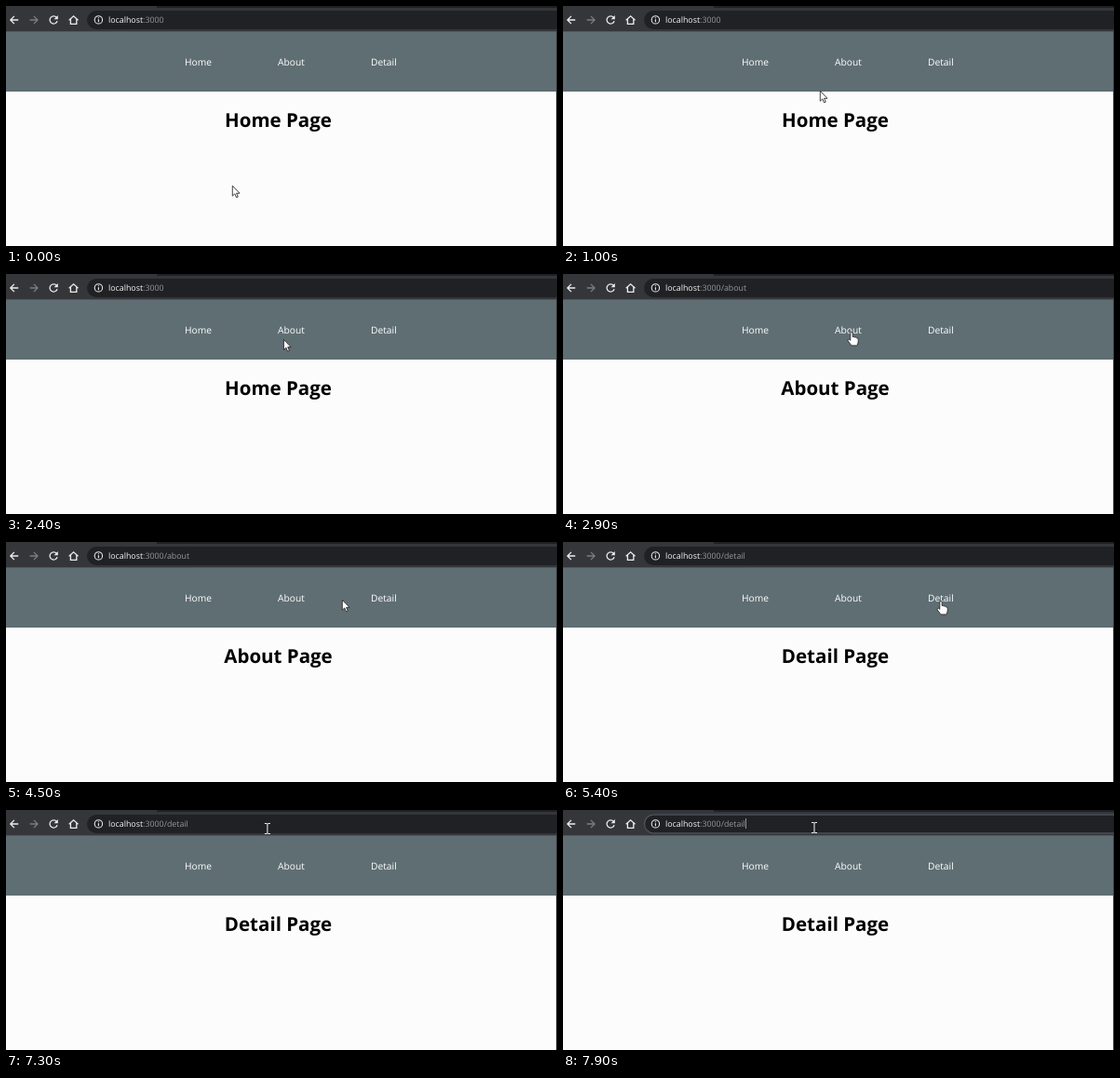
Animation, 592 px wide and 258 px high, one loop 8000 ms. Source, as an HTML page:

```html
<!DOCTYPE html>
<html lang="en">
<head>
<meta charset="utf-8">
<title>Routing demo</title>
<style>
  html, body { margin: 0; width: 100%; height: 100%; overflow: hidden; background: #fcfcfc; }
  svg { display: block; }
  text { font-family: "Open Sans", "Noto Sans", sans-serif; text-rendering: geometricPrecision; }
  .url { font-size: 8.85px; fill: #94979b; }
  .host { fill: #f4f5f6; }
  .nav { font-size: 10.25px; fill: #fff; }
  .title { font-size: 20.5px; font-weight: 700; fill: #000; text-anchor: middle; }
  .icon { fill: none; stroke: #eceded; stroke-width: 1.3; }
  .pointer { fill: #fff; stroke: #222; stroke-width: .85; }
</style>
</head>
<body>
<svg width="592" height="258" viewBox="0 0 592 258">
  <rect width="592" height="258" fill="#fcfcfc"/>

  <!-- browser toolbar -->
  <rect width="592" height="27" fill="#35363a"/>
  <rect x="162" width="430" height="2" fill="#202124"/>
  <rect x="87" y="5" width="530" height="20" rx="10" fill="#202124"/>
  <rect id="ring" x="87.5" y="5.2" width="530" height="19.6" rx="9.8" fill="none" stroke="#4b545d" stroke-width="1.3"/>
  <path class="icon" d="M13.2 15H5M8.9 10.9 4.8 15l4.1 4.1"/>
  <path class="icon" d="M25.6 15h8.2M29.9 10.9 34 15l-4.1 4.1" style="stroke:#7c7d80"/>
  <path class="icon" d="M54.4 12.4A4.1 4.1 0 1 0 55.1 16.2"/>
  <path d="M55.8 10v4.2h-4.2z" fill="#eceded"/>
  <path class="icon" d="M67.7 15.2 72.6 10.8 77.5 15.2M69.4 14V19.3H75.8V14"/>
  <circle class="icon" cx="99.4" cy="14.9" r="4.2" style="stroke-width:1.05"/>
  <path class="icon" d="M99.4 14.3v3M99.4 12.2v1.1" style="stroke-width:1.1"/>
  <text class="url" x="110" y="18"><tspan class="host">localhost</tspan><tspan id="path"></tspan></text>
  <rect id="caret" x="196" y="9" width="1" height="11" fill="#94979b"/>

  <!-- page -->
  <rect y="27" width="591" height="65" fill="#5f6e73"/>
  <rect y="27" width="592" height="1" fill="#4f5b60"/>
  <g id="nav"></g>
  <text class="title" id="title" x="292.5" y="129.5"></text>
  <rect x="591" y="27" width="1" height="231" fill="#45484b"/>

  <!-- pointer shapes, hotspot at 0,0 -->
  <g id="pointer">
    <path id="arrow" class="pointer" d="M.3.3V11.2L2.8 8.9 4.5 12.9 6.3 12.1 4.6 8.3H8Z"/>
    <path id="hand" class="pointer" d="M-1.2 8.4V.8Q-1.2-.5 0-.5T1.2.8V4.6Q2.6 4 3.4 5.1 4.8 4.6 5.4 5.8 7.2 5.4 7.2 7.2V9.8Q7 12 5.8 13.9H-.1Q-1.6 11.6-3.8 9Q-4.4 7.9-3.4 7.3T-1.2 8.4Z"/>
    <path id="beam" fill="none" stroke="#f4f4f4" d="M-3-5.5H-.8L0-4.8.8-5.5H3M0-5V5M-3 5.5H-.8L0 4.8.8 5.5H3"/>
  </g>
</svg>
<script>
  const LOOP = 8000, TICK = 100;
  const NAV_X = 192, NAV_GAP = 100, LINK_WIDTH = 29;

  const names = ["Home", "About", "Detail"];
  const clicks = { About: 2900, Detail: 5300 };
  const focusAt = 7400, caretAt = 7600;

  // Where the pointer pauses; sway is how far it sweeps sideways on the way there.
  const start = { x: 243, y: 193 };
  const about = { x: 310, y: 63 };
  const detail = { x: 406, y: 64 };
  const stops = [
    { t: 0, ...start },
    { t: 1000, x: 276, y: 91, sway: 75 },
    { t: 1900, x: 272.5, y: 86, sway: 75 },
    { t: 2700, ...about },
    { t: 4400, ...about },
    { t: 4500, x: 361, y: 62 },
    { t: 4800, ...detail },
    { t: 5800, ...detail },
    { t: 6600, x: 434.5, y: 87, sway: -40 },
    { t: focusAt, x: 274, y: 17 },
    { t: LOOP - TICK, x: 270, y: 19 },
    { t: LOOP, x: 270, y: 19 }
  ];

  const el = id => document.getElementById(id);
  const show = (id, on) => el(id).setAttribute("visibility", on ? "visible" : "hidden");
  const ease = k => k * k * (3 - 2 * k);
  const mix = (a, b, k) => a + (b - a) * k;

  names.forEach((name, i) => {
    const link = document.createElementNS("http://www.w3.org/2000/svg", "text");
    link.setAttribute("class", "nav");
    link.setAttribute("x", NAV_X + i * NAV_GAP);
    link.setAttribute("y", 64);
    link.textContent = name;
    el("nav").append(link);
  });

  function pointerAt(t) {
    const i = stops.findIndex(s => s.t > t);
    const from = stops[i - 1], to = stops[i];
    const k = ease((t - from.t) / (to.t - from.t));
    const sway = (to.sway || 0) * Math.sin(2 * Math.PI * k);
    return { x: mix(from.x, to.x, k) + sway, y: mix(from.y, to.y, k) };
  }

  function shapeAt({ x, y }) {
    if (y < 25) return "beam";
    const offset = x - NAV_X;
    const onLink = y > 54 && y < 69 && offset >= 0 && offset % NAV_GAP <= LINK_WIDTH;
    return onLink ? "hand" : "arrow";
  }

  function draw(t) {
    const page = names.filter(name => t >= (clicks[name] || 0)).pop();
    el("title").textContent = page + " Page";
    el("path").textContent = ":3000" + (page === "Home" ? "" : "/" + page.toLowerCase());

    const pos = pointerAt(t), shape = shapeAt(pos);
    el("pointer").setAttribute("transform", `translate(${pos.x} ${pos.y})`);
    for (const id of ["arrow", "hand", "beam"]) show(id, id === shape);

    show("ring", t >= focusAt);
    show("caret", t >= caretAt);
  }

  const begin = performance.now();
  function frame() {
    const t = (performance.now() - begin) % LOOP;
    draw(Math.floor(t / TICK) * TICK);
    requestAnimationFrame(frame);
  }
  frame();
</script>
</body>
</html>
```
